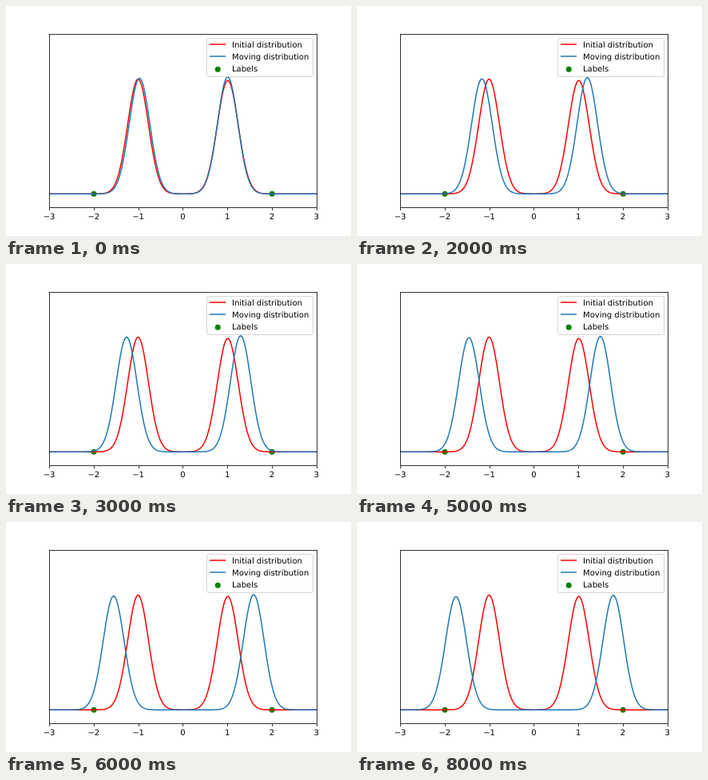
An HTML page that plays this animation: 432 px wide and 288 px high, repeating every 9000 ms.

```html
<!DOCTYPE html>
<html lang="en">
<head>
<meta charset="utf-8">
<title>Moving distribution</title>
<style>
  html, body { margin: 0; width: 100%; height: 100%; overflow: hidden; background: #fff; }
  svg { display: block; }
  text { font: 10px "DejaVu Sans", sans-serif; text-rendering: geometricPrecision; }
  .curve { fill: none; stroke-width: 1.5; stroke-linejoin: round; }
  .red { stroke: #f00; }
  .blue { stroke: #1f77b4; }
  .dot { fill: #008000; }
  .axis { fill: none; stroke: #000; stroke-width: .8; }
</style>
</head>
<body>
<svg width="432" height="288" viewBox="0 0 432 288">
  <defs><clipPath id="plot"><rect x="54" y="35" width="335" height="217"/></clipPath></defs>
  <circle class="dot" cx="110" cy="235.3" r="3.5"/>
  <circle class="dot" cx="333.1" cy="235.3" r="3.5"/>
  <g clip-path="url(#plot)">
    <path class="curve red" id="initial"/>
    <path class="curve blue" id="moving"/>
  </g>
  <rect class="axis" x="54.5" y="35.5" width="335" height="217"/>
  <g id="ticks"></g>
  <rect x="251.5" y="40.5" width="133" height="48" rx="2" fill="#fff" fill-opacity=".8" stroke="#ccc" stroke-opacity=".8"/>
  <path class="curve red" d="M255 48H275"/>
  <path class="curve blue" d="M255 63H275"/>
  <circle class="dot" cx="265.2" cy="79.2" r="3.5"/>
  <text x="283" y="52">Initial distribution</text>
  <text x="283" y="67">Moving distribution</text>
  <text x="283" y="82">Labels</text>
</svg>
<script>
const BASE = 235.2, STEP_MS = 1000, STEPS = 9;
const $ = id => document.getElementById(id);

const bell = (x, { mid, top, sd }) =>
  (BASE - top) * Math.exp(-((x - mid) ** 2) / (2 * sd * sd));

// Sum of two bells across the plot width
function curve(peaks) {
  const pts = [];
  for (let x = 54; x <= 389; x++) {
    const y = BASE - peaks.reduce((sum, p) => sum + bell(x, p), 0);
    pts.push(x + " " + y.toFixed(2));
  }
  return "M" + pts.join("L");
}

const movingPeaks = k => [
  { mid: 167.2 - 5.4 * k, top: 90.4 + 0.38 * k, sd: 12.9 + 0.03 * k },
  { mid: 277.6 + 5.42 * k, top: 88.8 + 0.37 * k, sd: 12.75 + 0.03 * k }
];

$("initial").setAttribute("d", curve([
  { mid: 165.4, top: 91.6, sd: 13 },
  { mid: 277.7, top: 93.2, sd: 13.1 }
]));

let ticks = "";
for (let v = -3; v <= 3; v++) {
  const x = 54 + 55.8 * (v + 3);
  const label = (v < 0 ? "\u2212" : "") + Math.abs(v);
  ticks += `<path class="axis" d="M${Math.round(x) + 0.5} 253V256"/>` +
    `<text x="${x}" y="267" text-anchor="middle">${label}</text>`;
}
$("ticks").innerHTML = ticks;

const start = performance.now();
let shown = -1;
function draw() {
  const k = Math.floor((performance.now() - start) / STEP_MS) % STEPS;
  if (k !== shown) {
    $("moving").setAttribute("d", curve(movingPeaks(k)));
    shown = k;
  }
  requestAnimationFrame(draw);
}
draw();
</script>
</body>
</html>
```
